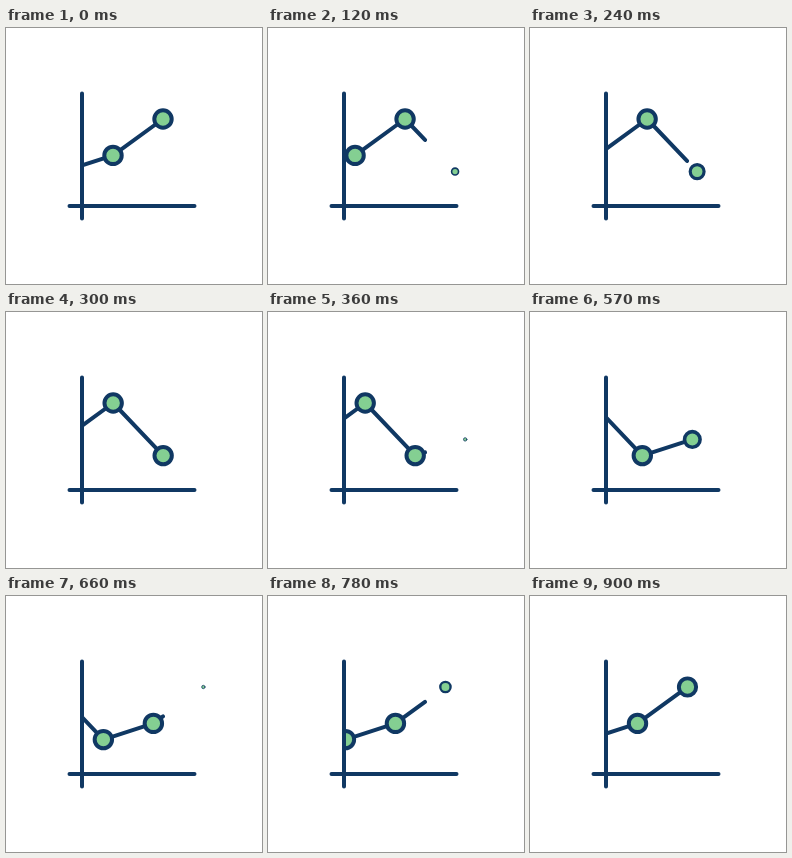
An HTML page for the animation above (930 ms loop, 256 px wide and 256 px high).

```html
<!DOCTYPE html>
<html lang="en">
<head>
<meta charset="utf-8">
<title>Line chart</title>
<style>
  html, body { margin: 0; width: 100%; height: 100%; overflow: hidden; background: #fff; }
  svg { display: block; width: 100vw; height: 100vh; }
</style>
</head>
<body>
<svg viewBox="0 0 256 256">
  <defs>
    <clipPath id="plot"><rect x="76" y="60" width="140" height="118"/></clipPath>
  </defs>
  <g stroke="#103863" stroke-width="4" stroke-linecap="round" stroke-linejoin="round">
    <g clip-path="url(#plot)">
      <path id="trend" fill="none"/>
      <g id="dots" fill="#84cf92"></g>
    </g>
    <path d="M76 65.500V190.500M63.500 178H188.500" fill="none"/>
  </g>
</svg>
<script>
const LOOP = 930, STEP = 30, SPEED = 149.5 / 900;
const GAP = 50, HEAD = 157, BORN = HEAD + GAP, RADIUS = 8.7;
const LEVELS = [143.6, 127.4, 91];
const $ = id => document.getElementById(id);

const points = Array.from({ length: 8 }, (_, i) => ({
  x: 7 + i * GAP,
  y: LEVELS[(i + 2) % 3]
}));

const dots = points.map(() => {
  const dot = document.createElementNS("http://www.w3.org/2000/svg", "circle");
  dot.setAttribute("r", RADIUS);
  $("dots").append(dot);
  return dot;
});

function draw(t) {
  const shift = t * SPEED;
  let d = "";
  points.forEach((p, i) => {
    const x = p.x - shift;
    const scale = Math.max(0, Math.min(1, (BORN - x) / GAP));
    dots[i].setAttribute("transform", `translate(${x} ${p.y}) scale(${scale})`);
    dots[i].style.display = scale > 0.01 && x > 50 ? "" : "none";

    // The line is revealed only up to HEAD.
    if (x <= HEAD) {
      d += `${d ? "L" : "M"}${x} ${p.y}`;
    } else if (x - GAP < HEAD) {
      const prev = points[i - 1];
      const k = (HEAD - x + GAP) / GAP;
      d += `L${HEAD} ${prev.y + (p.y - prev.y) * k}`;
    }
  });
  $("trend").setAttribute("d", d);
}

const start = performance.now();
function tick() {
  const t = (performance.now() - start) % LOOP;
  draw(Math.floor(t / STEP) * STEP);
  requestAnimationFrame(tick);
}
draw(0);
requestAnimationFrame(tick);
</script>
</body>
</html>
```
